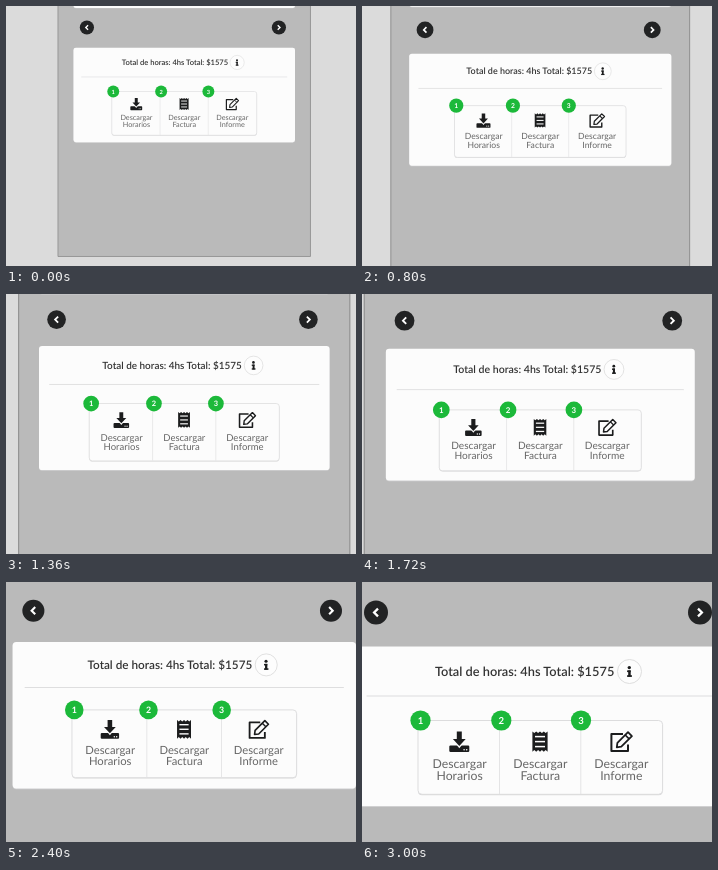
Write an HTML page with a canvas that moves like this. It is 350 px wide and 260 px high and loops after 3600 ms.

```html
<!DOCTYPE html>
<html lang="es">
<head>
<meta charset="utf-8">
<title>Descargas</title>
<style>
html, body { margin: 0; width: 100%; height: 100%; overflow: hidden; background: #dbdbdb; }
canvas { display: block; width: 350px; height: 260px; }
</style>
</head>
<body>
<canvas id="stage" width="350" height="260"></canvas>
<script>
const ctx = document.getElementById('stage').getContext('2d');
const LOOP = 3600, ZOOM_END = 3000, STEP = 40;
const MAX_ZOOM = 1.6875;
const FIX = { x: 178.2, y: 8.4 };   // point that stays put while zooming
const INK = '#1b1c1d';

function box(x, y, w, h, r, fill, line, lw = 1) {
  ctx.beginPath();
  ctx.roundRect(x, y, w, h, r);
  if (fill) { ctx.fillStyle = fill; ctx.fill(); }
  if (line) { ctx.strokeStyle = line; ctx.lineWidth = lw; ctx.stroke(); }
}

function disc(x, y, r, fill, line) {
  ctx.beginPath();
  ctx.arc(x, y, r, 0, Math.PI * 2);
  ctx.fillStyle = fill;
  ctx.fill();
  if (line) { ctx.strokeStyle = line; ctx.lineWidth = 1; ctx.stroke(); }
}

function trace(pts, closed) {
  ctx.beginPath();
  pts.forEach(([x, y]) => ctx.lineTo(x, y));
  if (closed) ctx.closePath();
}

function shape(pts, fill) {
  trace(pts, true);
  ctx.fillStyle = fill;
  ctx.fill();
}

function stroke(pts, color, lw, closed) {
  trace(pts, closed);
  ctx.strokeStyle = color;
  ctx.lineWidth = lw;
  ctx.stroke();
}

function text(str, x, y, size, weight, color) {
  ctx.font = `${weight} ${size}px Lato, sans-serif`;
  ctx.textAlign = 'center';
  ctx.fillStyle = color;
  ctx.fillText(str, x, y);
}

function at(x, y, draw) {
  ctx.save();
  ctx.translate(x, y);
  draw();
  ctx.restore();
}

function card(y, h) {
  box(-8.6, y + 0.8, 373.8, h, 4, '#d0d0d1');
  box(-8.6, y, 373.8, h, 4, '#fcfcfc');
}

function arrow(x, dir) {
  at(x, 30.5, () => {
    disc(0, 0, 12, '#222324');
    stroke([[-2 * dir, -3.9], [1.9 * dir, 0], [-2 * dir, 3.9]], '#fff', 2.3);
  });
}

function infoIcon() {
  disc(267.5, 89.5, 12, '#fdfdfd', '#dedede');
  disc(267.3, 85.6, 1.7, INK);
  ctx.fillRect(265.1, 88.4, 3.6, 1.7);
  ctx.fillRect(266.2, 88.4, 2.5, 6.2);
  ctx.fillRect(265.1, 93.2, 4.8, 1.7);
}

function downloadIcon() {
  box(-10, 4, 20, 6.4, 1.2, INK);
  shape([[-7.4, -2.6], [7.4, -2.6], [0, 6.6]], '#fcfcfc');
  shape([[-2.5, -10], [2.5, -10], [2.5, -2.6], [6.4, -2.6], [0, 4.4], [-6.4, -2.6], [-2.5, -2.6]], INK);
  disc(4.8, 8.1, 0.8, '#fcfcfc');
  disc(7.4, 8.1, 0.8, '#fcfcfc');
}

function receiptIcon() {
  const pts = [], teeth = 8;
  const edge = i => [-7.6 + 15.2 * i / teeth, 10.2 - (i % 2) * 1.7];
  for (let i = 0; i <= teeth; i++) pts.push(edge(i));
  for (let i = teeth; i >= 0; i--) pts.push([edge(i)[0], -edge(i)[1]]);
  shape(pts, INK);
  ctx.fillStyle = '#fcfcfc';
  for (const y of [-5, 0, 5]) ctx.fillRect(-5, y - 0.75, 10, 1.5);
}

function editIcon() {
  ctx.lineJoin = 'round';
  stroke([[2, -7.5], [-9.6, -7.5], [-9.6, 9.4], [7, 9.4], [7, 3]], INK, 2);
  const pencil = [[-3.6, 1.2], [7, -9.4], [10.9, -5.5], [0.3, 5.1], [-4.2, 5.7]];
  shape(pencil, '#fcfcfc');
  stroke(pencil, INK, 1.8, true);
  stroke([[4.2, -6.6], [8.1, -2.7]], INK, 1.6);
}

const ACTIONS = [
  { x: 97.3, badge: 58.5, icon: downloadIcon, label: 'Horarios' },
  { x: 178, badge: 139.3, icon: receiptIcon, label: 'Factura' },
  { x: 259, badge: 219, icon: editIcon, label: 'Informe' }
];

function actions() {
  box(56, 139.4, 244.6, 73.8, 4, '#d9d9da');
  box(56, 138.5, 244.6, 73.8, 4, '#fcfcfc', '#dcdcdd');
  for (const x of [137.5, 218.8]) stroke([[x, 139], [x, 212]], '#e4e4e5', 1);
  ACTIONS.forEach((a, i) => {
    at(a.x, 159.6, a.icon);
    text('Descargar', a.x + 0.3, 186.3, 12.25, 400, '#666');
    text(a.label, a.x + 0.3, 198.4, 12.25, 400, '#666');
    disc(a.badge, 138.5, 10.1, '#1cb93a');
    text(i + 1, a.badge, 141.9, 9.6, 700, '#fff');
  });
}

function render(ms) {
  const t = Math.min(Math.floor((ms % LOOP) / STEP) * STEP, ZOOM_END);
  const zoom = 1 + (MAX_ZOOM - 1) * t / ZOOM_END;
  const k = zoom / MAX_ZOOM;

  ctx.setTransform(1, 0, 0, 1, 0, 0);
  ctx.fillStyle = '#dbdbdb';
  ctx.fillRect(0, 0, 350, 260);
  ctx.setTransform(k, 0, 0, k, FIX.x * (1 - k), FIX.y * (1 - k));
  ctx.lineJoin = 'miter';
  ctx.textRendering = 'geometricPrecision';

  box(-34.8, -60, 426.1, 476.9, 0, '#bababa', '#8e8e8e', 1.4);
  card(-50, 47.4);
  arrow(14, -1);
  arrow(338, 1);
  card(64.5, 159.6);
  text('Total de horas: 4hs Total: $1575', 162.6, 94, 12.8, 600, '#333');
  infoIcon();
  stroke([[4.5, 114], [352, 114]], '#dededf', 1.1);
  actions();
}

const start = performance.now();
function tick() {
  render(performance.now() - start);
  requestAnimationFrame(tick);
}
tick();
</script>
</body>
</html>
```
